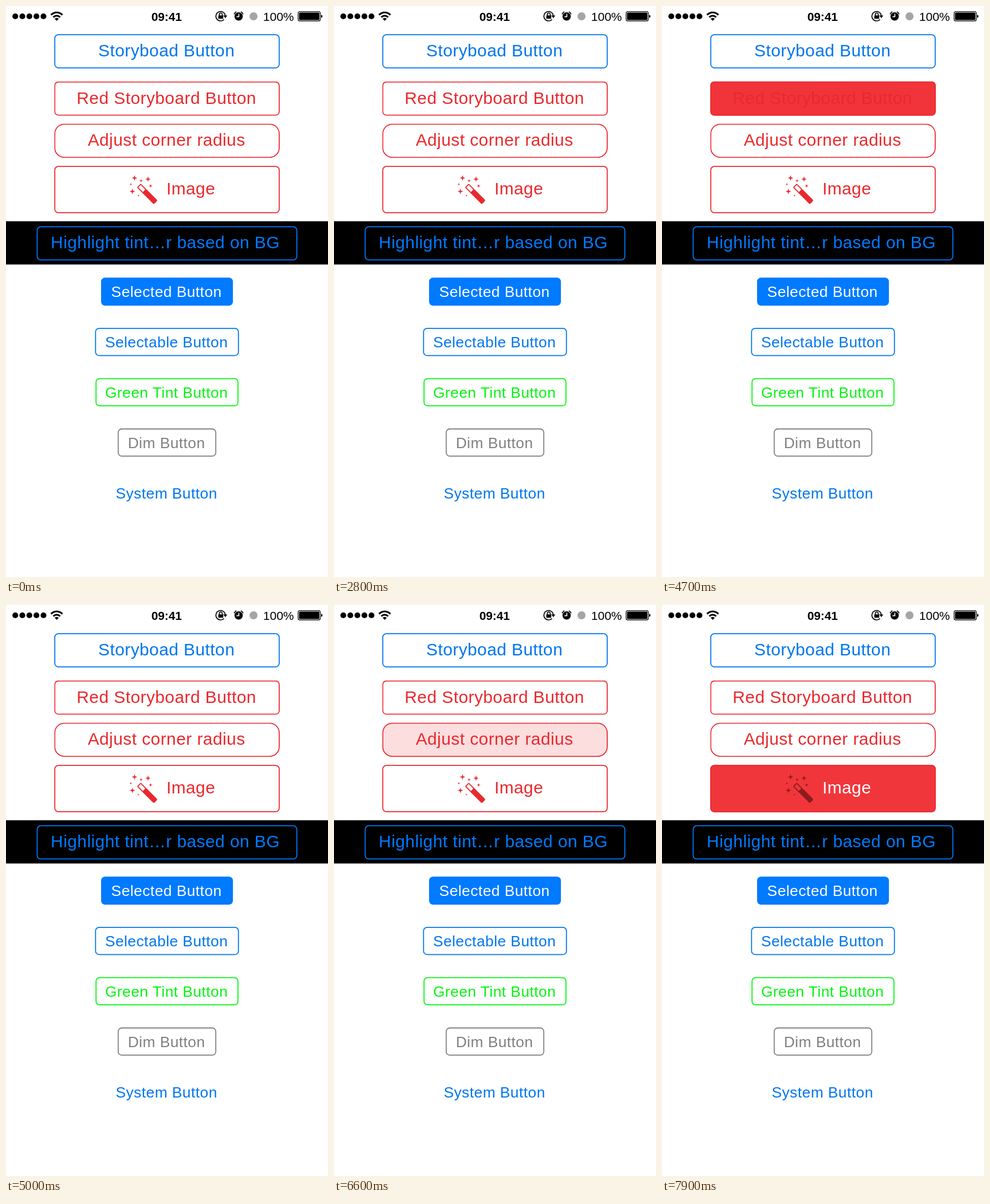
Animation of 562x997 px, one loop 8000 ms. Source, as an HTML page:

```html
<!DOCTYPE html>
<html lang="en">
<head>
<meta charset="utf-8">
<title>Bordered buttons</title>
<style>
  html, body { margin: 0; width: 100%; height: 100%; overflow: hidden; background: #fff; }
  svg { display: block; width: 562px; height: 997px; }
  text { font-family: "Liberation Sans", Arial, sans-serif; text-anchor: middle; white-space: pre; }
  #buttons text { letter-spacing: .27px; }
  .line { fill: none; stroke: #000; stroke-width: 1.6; }
</style>
</head>
<body>
<svg viewBox="0 0 562 997">
  <g id="signal"></g>
  <g class="line" style="stroke-width: 3">
    <path d="M78.6 15.6a13.6 13.6 0 0 1 19.8 0"/>
    <path d="M82.6 19.6a8.2 8.2 0 0 1 11.8 0"/>
  </g>
  <path d="M84.9 22.3a5 5 0 0 1 7.2 0L88.5 26z"/>
  <text x="280.3" y="25.6" font-size="20.8" font-weight="bold">09:41</text>
  <path class="line" d="M380.4 23.6a8.2 8.2 0 1 1 2.3-6.6M372.4 17v-2.2a2.5 2.5 0 0 1 5 0V17"/>
  <path d="M379.4 16.6h6.8l-3.4 4.6zM370.6 16.4h8.6v5.8h-8.6z"/>
  <circle cx="406" cy="18.3" r="7.2"/>
  <path class="line" d="M398 14.4a9.4 9.4 0 0 1 4-4.4M410 10a9.4 9.4 0 0 1 4 4.4"/>
  <path class="line" d="M406.4 13.6v5h-4" style="stroke: #fff"/>
  <circle cx="432" cy="18" r="7" fill="#a5a5a5"/>
  <text x="475.7" y="25.7" font-size="21">100%</text>
  <rect class="line" x="509.8" y="9.8" width="38.8" height="16.4" rx="3" style="stroke-width: 1.2"/>
  <rect x="511.4" y="11.4" width="35.6" height="13.2" rx="1.6"/>
  <path d="M550 15.2q2.4 .6 2.4 2.8t-2.4 2.8z"/>
  <g id="buttons" transform="scale(1.75625)">
    <rect y="214" width="320" height="43"/>
  </g>
</svg>
<script>
const LOOP = 8000, FADE = 300, MID = 160;
const BLUE = '#0076ee', TINT = '#007aff', RED = '#e8292e', RED_FILL = '#f13238', DARK = '#8a1c1f';
const layer = document.getElementById('buttons');

function add(parent, tag, attrs) {
  const el = document.createElementNS('http://www.w3.org/2000/svg', tag);
  for (const key in attrs) el.setAttribute(key, attrs[key]);
  return parent.appendChild(el);
}

// Runs value "off", then "on" between down and up; fades take FADE ms, swaps none.
function press(el, prop, off, on, [down, up = LOOP], fade = 0) {
  const steps = [[0, off], [down, off], [down + fade, on], [up, on]];
  if (up < LOOP) steps.push([up + fade, off], [LOOP, off]);
  el.animate(steps.map(([t, value]) => ({ offset: t / LOOP, [prop]: value, easing: 'ease-in-out' })),
    { duration: LOOP, iterations: Infinity });
}

// Sparkles go round the tip of the wand in even steps, one of them nearer.
function wand() {
  const icon = add(layer, 'g', { fill: RED, transform: 'scale(.5694)' });
  let d = '';
  for (let i = 0; i < 7; i++) {
    const angle = (103 + 43 * i) * Math.PI / 180, far = i === 4 ? 9 : 17.4;
    const x = 235 + far * Math.cos(angle), y = 314 + far * Math.sin(angle);
    const r = i % 2 ? 5 : 2 + i / 4;
    for (let k = 0; k < 8; k++) {
      const a = k * Math.PI / 4, len = k % 2 ? r * 0.33 : r;
      d += `${k ? 'L' : 'M'}${x + len * Math.cos(a)} ${y + len * Math.sin(a)}`;
    }
    d += 'z';
  }
  add(icon, 'path', { d });
  const stick = add(icon, 'g', { transform: 'translate(231.8 313.4) rotate(45)' });
  add(stick, 'path', {
    'fill-rule': 'evenodd',
    d: 'M1-4.7H39.5a2.2 2.2 0 0 1 2.2 2.2v5a2.2 2.2 0 0 1-2.2 2.2H1l-1-1V-3.7zM1.8-2.9H13V2.9H1.8z' });
  return icon;
}

function button(label, color, y, o = {}) {
  const { w = 224, h = 34, r = 4, size = 17, drop = 5.1, textX = MID - 0.5, solid, plain, hold, icon } = o;
  const box = (inset, attrs) => add(layer, 'rect', {
    x: MID - w / 2 + inset, y: y + inset, width: w - 2 * inset, height: h - 2 * inset,
    rx: r - inset, ...attrs });

  if (hold) press(box(0, { fill: RED_FILL, opacity: 0 }), 'opacity', 0, 1, hold, FADE);
  if (solid) box(0, { fill: color });
  else if (!plain) box(0.5, { fill: 'none', stroke: color });
  if (icon) press(wand(), 'fill', RED, DARK, hold);

  const text = add(layer, 'text', {
    x: textX, y: y + h / 2 + drop, 'font-size': size, fill: solid ? '#fff' : color });
  text.textContent = label;
  if (hold) press(text, 'fill', color, '#ffffff', hold);
}

button('Storyboad Button', BLUE, 28);
button('Red Storyboard Button', RED, 75, { hold: [4085, 4680] });
button('Adjust corner radius', RED, 117, { r: 10, hold: [5885, 6385] });
button('Image', RED, 159, { h: 47, textX: 183.7, icon: true, hold: [7630] });
button('Highlight tint…r based on BG', TINT, 219, { w: 259, textX: 158.3 });

const small = (label, color, row, o) =>
  button(label, color, 270 + 50 * row, { h: 28, size: 15, drop: 5.5, ...o });
small('Selected Button', TINT, 0, { w: 131, solid: true });
small('Selectable Button', BLUE, 1, { w: 143 });
small('Green Tint Button', '#08f412', 2, { w: 142 });
small('Dim Button', '#808080', 3, { w: 98 });
small('System Button', BLUE, 4, { plain: true });

const signal = document.getElementById('signal');
for (let i = 0; i < 5; i++) add(signal, 'circle', { cx: 16.2 + i * 12.3, cy: 18, r: 5.1 });
</script>
</body>
</html>
```
